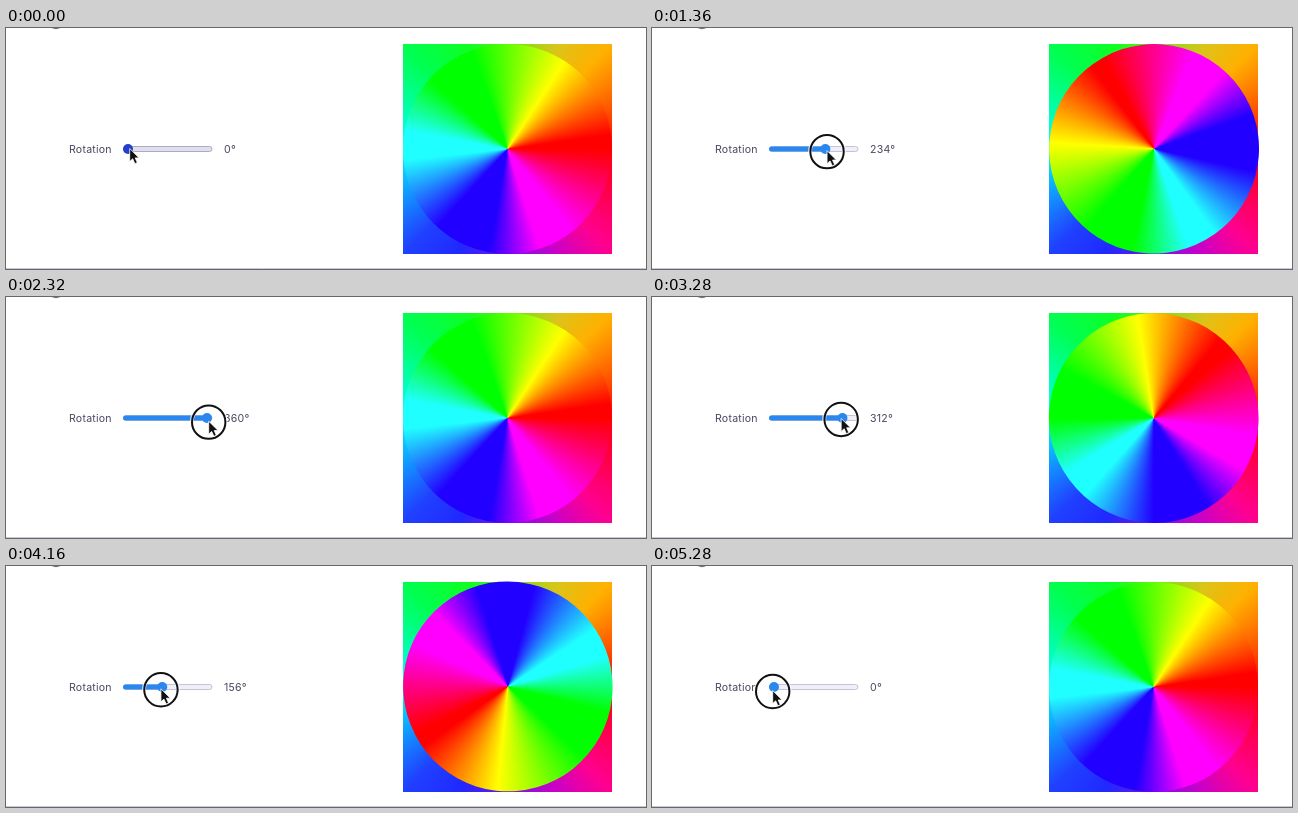
An HTML page for the animation above (5360 ms loop, 640x241 px).

```html
<!DOCTYPE html>
<html lang="en">
<head>
<meta charset="utf-8">
<style>
  html, body { margin: 0; width: 100%; height: 100%; overflow: hidden; background: #fff; }
  #stage { position: absolute; left: 0; top: 0; width: 640px; height: 241px; overflow: hidden; }
  #square, #wheel { position: absolute; left: 396.5px; top: 16px; width: 209.5px; height: 209.5px; }
  #square {
    background: conic-gradient(from 90deg, red, #ff0090 45deg, #c800c8 65deg, #2028ff 115deg, #2040ff 135deg,
      cyan 180deg, #00ff50 225deg, #10ff20 250deg, #dcc418 297deg, #ffb000 315deg, red);
  }
  #wheel {
    border-radius: 50%;
    background: conic-gradient(from 90deg, red, #f0f 52deg 72deg, #20f 100deg 132deg, #20ffff 174deg 190deg,
      lime 222deg 250deg, #ff0 303deg, red 352deg);
  }
  svg { position: absolute; left: 0; top: 0; }
  text { font: 10.6px Inter, "Open Sans", sans-serif; letter-spacing: .2px; fill: #484860; }
</style>
</head>
<body>
<div id="stage">
  <div id="square"></div>
  <div id="wheel"></div>
  <svg width="640" height="241">
    <path d="M45 -1.2Q50 2 55 -1.2" fill="none" stroke="#777" stroke-width="1.5"/>
    <path d="M0 240.5H640" stroke="#c6c9dc"/>
    <text x="63" y="124.8">Rotation</text>
    <text id="value" x="218" y="124.8"></text>
    <rect id="track" x="117.5" y="118.5" width="88.5" height="5" rx="2.5"/>
    <rect id="fill" x="117" y="118.5" height="5" rx="2.5" fill="#2b87f0"/>
    <circle id="thumb" cy="121" r="5"/>
    <g id="pointer">
      <g id="ring" fill="none">
        <circle cy="1" r="17" stroke="#fff" stroke-width="4" opacity=".7"/>
        <circle cy="1" r="16.7" stroke="#111" stroke-width="2"/>
      </g>
      <path d="M0 0V13L3 10.3L5.2 15.2L7.6 14.1L5.5 9.4H9.4Z" fill="#111" stroke="#fff" stroke-width=".8"/>
    </g>
  </svg>
</div>
<script>
const LOOP = 5360, HALF = LOOP / 2, STEP = 80;

const el = id => document.getElementById(id);
const set = (id, name, value) => el(id).setAttribute(name, value);
const progress = (t, from, to) => Math.min(1, Math.max(0, (t - from) / (to - from)));

// One drag out that slows down, a rest, then an even drag back.
function turnAt(t) {
  const out = progress(t, 0, 2320) ** 0.81;
  const back = progress(t, 3010, 5040);
  return 2 * Math.round(180 * (out - back));
}

function draw(now) {
  const t = Math.floor(now % LOOP / STEP) * STEP;
  const pressed = t > 0;
  const turn = turnAt(t);
  const thumbX = 122 + 79 * turn / 360;

  // The hand leads the thumb slightly and sinks during each drag.
  const handX = thumbX + (t < HALF ? 1.7 : -1.3);
  const handY = 120.5 + 4.2 * (t % HALF) / HALF;

  // The wheel trails in the first half turn and leads in the second.
  const angle = turn - 8 * Math.sin(turn * Math.PI / 180);

  el("wheel").style.transform = `rotate(${angle}deg)`;
  el("value").textContent = turn + "°";
  set("track", "fill", pressed ? "#efeff8" : "#dedeed");
  set("track", "stroke", pressed ? "#c3c3da" : "#acacc4");
  set("fill", "width", turn ? thumbX - 117 : 0);
  set("thumb", "cx", thumbX);
  set("thumb", "fill", pressed ? "#2b87f0" : "#2440c8");
  set("ring", "visibility", pressed ? "visible" : "hidden");
  set("pointer", "transform", `translate(${handX} ${handY})`);
}

const start = performance.now();
function tick() {
  draw(performance.now() - start);
  requestAnimationFrame(tick);
}
tick();
</script>
</body>
</html>
```
